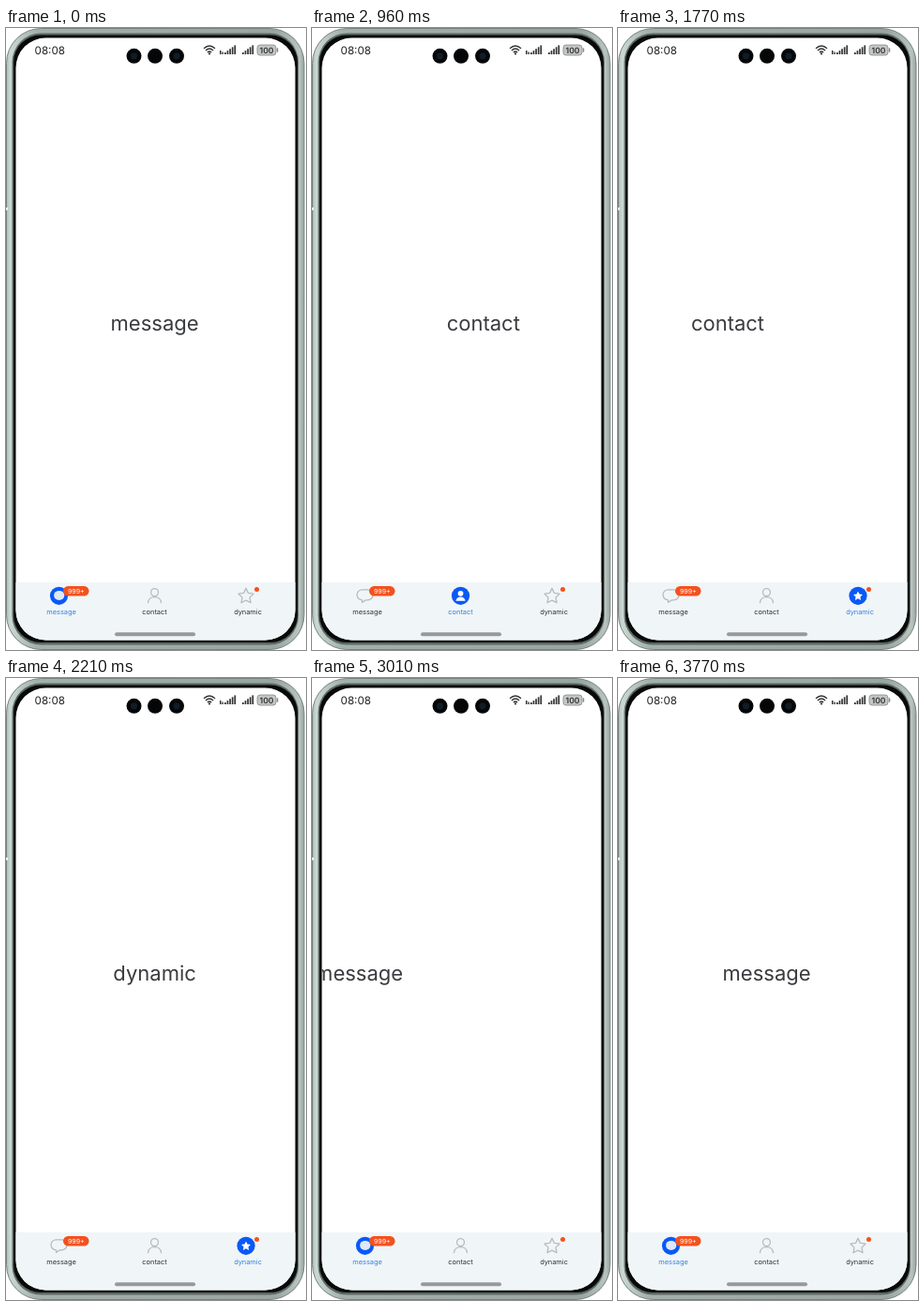
An HTML page that plays this animation: 320x662 px, repeating every 3850 ms.

```html
<!DOCTYPE html>
<html lang="en">
<head>
<meta charset="utf-8">
<title>Bottom tabs</title>
<style>
  html, body { margin: 0; width: 100%; height: 100%; overflow: hidden; background: #fff; }
  svg { display: block; width: 320px; height: 662px; font-family: Inter, sans-serif; text-rendering: geometricPrecision; }
  .page { font-size: 22px; fill: #3a3b3f; text-anchor: middle; }
  .label { font-size: 7.4px; text-anchor: middle; fill: #333; }
  .on .label { fill: #3583e6; }
  .line { fill: none; stroke: #b9bcbe; stroke-width: 1.3; stroke-linecap: round; stroke-linejoin: round; }
  .fill, .on .line { display: none; }
  .on .fill { display: inline; }
</style>
</head>
<body>
<svg viewBox="0 0 320 662">
  <defs>
    <clipPath id="screen"><rect x="10.5" y="10.5" width="298" height="641" rx="32"/></clipPath>
    <linearGradient id="metal">
      <stop offset="0" stop-color="#aebdb7"/>
      <stop offset=".012" stop-color="#cbd8d2"/>
      <stop offset=".1" stop-color="#a3b1ac"/>
      <stop offset=".9" stop-color="#98a5a0"/>
      <stop offset=".985" stop-color="#b9c4bf"/>
      <stop offset="1" stop-color="#98a39f"/>
    </linearGradient>
    <path id="star" d="M0-7.9 2.4-2.9 8-2.1 4 1.8 5 7.4 0 4.8-5 7.4-4 1.8-8-2.1-2.4-2.9Z"/>
    <path id="bubble" d="M-3-6.2H3A5.5 5.5 0 0 1 3 4.8H1L-3 7.4V4.8A5.5 5.5 0 0 1-3-6.2Z"/>
    <path id="person" d="M0-7.4A4 4 0 0 1 0 .6A4 4 0 0 1 0-7.4ZM-7 7.6C-6.4-.4 6.4-.4 7 7.6"/>
  </defs>

  <rect x=".5" y=".5" width="317.5" height="661" rx="37" fill="url(#metal)" stroke="#77837f"/>
  <rect x="6.5" y="5.5" width="305.5" height="651" rx="31" fill="#5d6864"/>
  <rect x="8" y="7.5" width="303" height="646.5" rx="29" fill="#080a0a"/>
  <rect x="0" y="191" width="2" height="3" fill="#e9efec"/>

  <g clip-path="url(#screen)">
    <rect x="10" y="10" width="299" height="642" fill="#fff"/>
    <g id="pages" class="page"></g>
    <rect x="10" y="590" width="299" height="62" fill="#f0f5f7"/>

    <g class="tab">
      <use href="#bubble" class="line" x="56.5" y="604"/>
      <g class="fill">
        <circle cx="56.5" cy="604.3" r="9.6" fill="#0a59f7"/>
        <ellipse cx="56.7" cy="603.9" rx="5.6" ry="5" fill="#dfe9f3"/>
      </g>
      <text class="label" x="59" y="623.5">message</text>
      <rect x="61" y="594" width="27.5" height="10.5" rx="5.2" fill="#f4511e"/>
      <text x="74.8" y="601.7" font-size="7" fill="#fff" text-anchor="middle">999+</text>
    </g>
    <g class="tab">
      <use href="#person" class="line" x="158.5" y="604"/>
      <g class="fill">
        <circle cx="158.5" cy="604.3" r="9.6" fill="#0a59f7"/>
        <use href="#person" transform="translate(158.5 604.3) scale(.72)" fill="#fff"/>
      </g>
      <text class="label" x="158.5" y="623.5">contact</text>
    </g>
    <g class="tab">
      <use href="#star" class="line" x="256" y="604.3"/>
      <g class="fill">
        <circle cx="256" cy="604.3" r="9.6" fill="#0a59f7"/>
        <use href="#star" transform="translate(256 604.3) scale(.62)" fill="#fff"/>
      </g>
      <text class="label" x="258" y="623.5">dynamic</text>
      <circle cx="267.5" cy="597.5" r="2.5" fill="#f4511e"/>
    </g>

    <circle id="touch" cy="616.5" r="9" fill="#fff" fill-opacity=".65" stroke="#c3c8ca" stroke-width=".9"/>
    <rect x="116" y="643.2" width="86" height="4" rx="2" fill="#97999b"/>

    <text x="30.6" y="28" font-size="11.6" fill="#222">08:08</text>
    <g id="status" fill="#333">
      <path d="M211 21.8Q217 16.2 223 21.8M212.9 23.9Q217 20.2 221.1 23.9M214.8 25.9Q217 24 219.2 25.9" fill="none" stroke="#333" stroke-width="1.3"/>
      <circle cx="217" cy="27.4" r="1.1"/>
      <rect x="268" y="18" width="20" height="11" rx="3" fill="#c4c6c7" stroke="#85888a" stroke-width=".8"/>
      <rect x="288.8" y="21.3" width="1.5" height="4.4" rx=".7" fill="#85888a"/>
      <text x="278" y="26.8" font-size="8.6" font-weight="600" text-anchor="middle">100</text>
      <path d="M228 24h1.5v4H228ZM230.4 25.5h1.4V28h-1.4Z"/>
    </g>
    <g fill="#050607">
      <circle cx="136.5" cy="29.8" r="8"/>
      <circle cx="159" cy="29.8" r="8"/>
      <circle cx="182" cy="29.8" r="8"/>
    </g>
    <g fill="#101c26">
      <circle cx="136.5" cy="29.8" r="3.6"/>
      <circle cx="182" cy="29.8" r="3.6"/>
    </g>
  </g>
</svg>
<script>
const LOOP = 3850, SLIDE = 300, PAGE = 298;
const taps = [
  { at: 762, from: 0, to: 1 },
  { at: 1710, from: 1, to: 2 },
  { at: 2850, from: 2, to: 0 },
];
const touchX = [64, 163, 262];
const pages = document.getElementById('pages');
const touch = document.getElementById('touch');
const status = document.getElementById('status');
const tabs = document.querySelectorAll('.tab');

function add(parent, name, attrs, text = '') {
  const el = document.createElementNS('http://www.w3.org/2000/svg', name);
  for (const key in attrs) el.setAttribute(key, attrs[key]);
  el.textContent = text;
  parent.append(el);
}

['message', 'contact', 'dynamic'].forEach((text, i) =>
  add(pages, 'text', { x: 158.6 + i * PAGE, y: 322 }, text));

// Two rows of rising signal bars
for (const left of [233, 252])
  for (let i = 0; i < 5; i++) {
    const height = 2 + i * 1.9;
    add(document.getElementById('status'), 'rect',
      { x: left + i * 2.6, y: 28 - height, width: 1.7, height });
  }

// cubic-bezier(.4, 0, .2, 1)
function ease(x) {
  if (x <= 0 || x >= 1) return x <= 0 ? 0 : 1;
  let lo = 0, hi = 1;
  for (let i = 0; i < 20; i++) {
    const s = (lo + hi) / 2, r = 1 - s;
    if (1.2 * r * r * s + .6 * r * s * s + s ** 3 < x) lo = s; else hi = s;
  }
  return lo * lo * (3 - 2 * lo);
}

function draw(now) {
  const t = now % LOOP;
  let position = 0, selected = 0;
  for (const { at, from, to } of taps)
    if (t >= at) {
      position = from + (to - from) * ease((t - at) / SLIDE);
      selected = to;
    }
  const press = taps.find(({ at }) => t >= at - 140 && t < at);
  pages.setAttribute('transform', `translate(${-position * PAGE})`);
  tabs.forEach((tab, i) => tab.classList.toggle('on', i === selected));
  touch.style.display = press ? '' : 'none';
  if (press) touch.setAttribute('cx', touchX[press.to]);
}

const start = performance.now();
function tick() {
  draw(performance.now() - start);
  requestAnimationFrame(tick);
}
tick();
</script>
</body>
</html>
```
